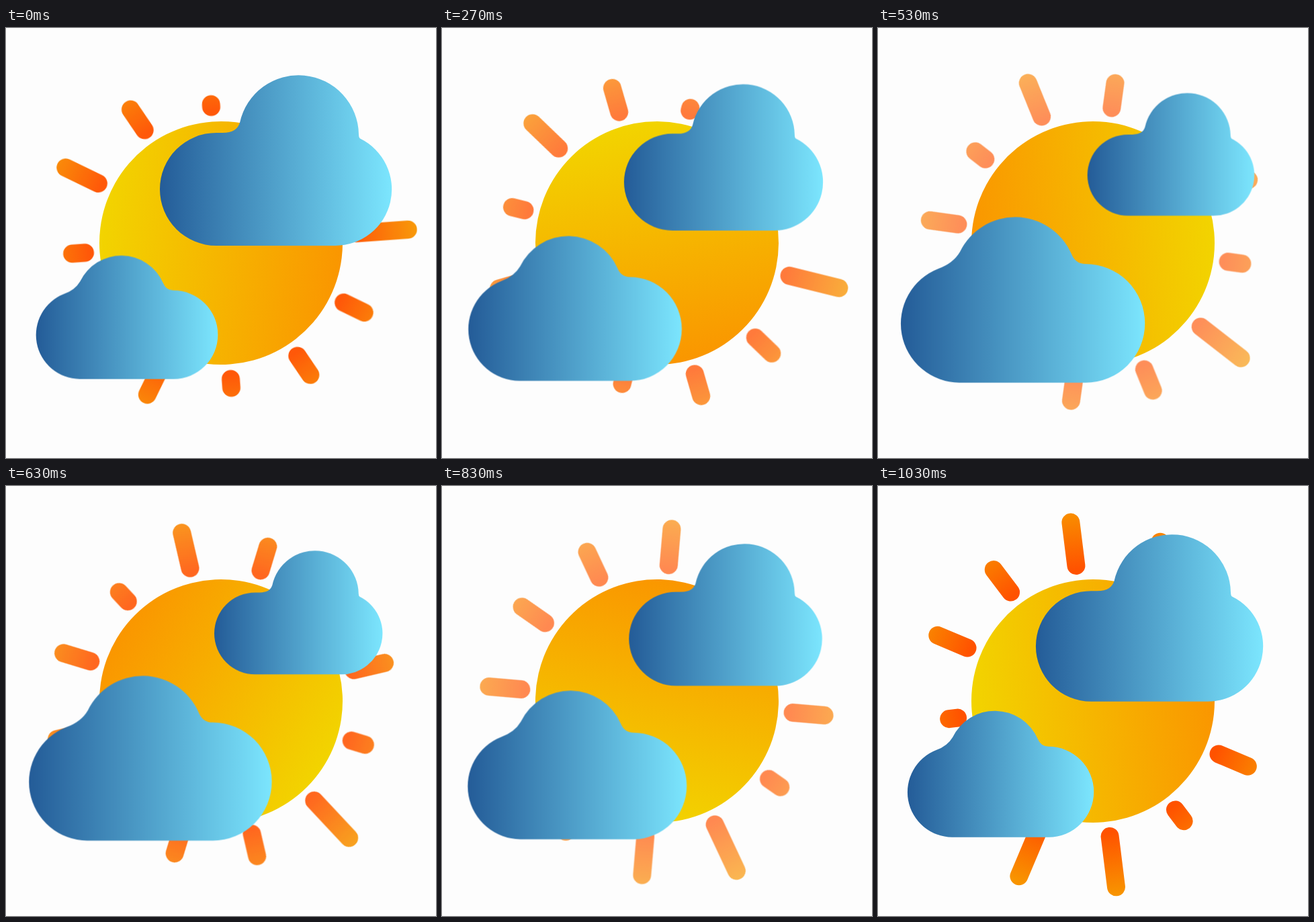
Animation, 640 px wide and 640 px high, one loop 1.06 s. Source, as an HTML page:

```html
<!DOCTYPE html>
<html lang="en">
<head>
<meta charset="utf-8">
<title>Sun and clouds</title>
<style>
  html, body { margin: 0; width: 100%; height: 100%; overflow: hidden; background: #fdfdfd; }
  svg { display: block; width: 100%; height: 100%; }
</style>
</head>
<body>
<svg viewBox="0 0 640 640">
  <defs>
    <linearGradient id="sunFill" x1="0" y1="0" x2="0" y2="1">
      <stop offset="0" stop-color="#f2d400"/>
      <stop offset="1" stop-color="#fa9600"/>
    </linearGradient>
    <radialGradient id="rayFill" gradientUnits="userSpaceOnUse" cx="0" cy="0" r="290">
      <stop offset=".68" stop-color="#ff5200"/>
      <stop offset="1" stop-color="#f89400"/>
    </radialGradient>
    <linearGradient id="cloudFill">
      <stop offset="0" stop-color="#245c98"/>
      <stop offset="1" stop-color="#7ce6fe"/>
    </linearGradient>
  </defs>
  <circle id="sun" cx="320" cy="320" r="181" fill="url(#sunFill)"/>
  <g id="rays" fill="url(#rayFill)"></g>
  <path id="rightCloud" fill="url(#cloudFill)" d="M313 324A84 84 0 0 1 313 156H322C338 156 345 150 348 141A89.5 89.5 0 0 1 525 158Q525 163 527 164.5A84 84 0 0 1 490 324Z"/>
  <path id="leftCloud" fill="url(#cloudFill)" d="M121 528A88 88 0 0 1 90 358Q112 350 122 333A91.4 91.4 0 0 1 288 336Q294 351 309 351A88.5 88.5 0 0 1 309 528Z"/>
</svg>
<script>
const LOOP = 1060, STEP = 100 / 3, CYCLE = 30;
const INNER = 203, CAP = 13.5;
const REACH = [207, 250, 224, 279, 237, 237, 216, 251, 245, 222, 257, 240];

const byId = id => document.getElementById(id);
const sun = byId("sun"), rayGroup = byId("rays");

const rays = REACH.map((_, i) => {
  const ray = document.createElementNS("http://www.w3.org/2000/svg", "rect");
  ray.setAttribute("x", -CAP);
  ray.setAttribute("width", 2 * CAP);
  ray.setAttribute("rx", CAP);
  ray.setAttribute("transform", `rotate(${360 / REACH.length * i})`);
  return rayGroup.appendChild(ray);
});

function smoothstep(from, to, x) {
  const u = Math.min(1, Math.max(0, (x - from) / (to - from)));
  return u * u * (3 - 2 * u);
}

function scaleAbout(id, x, y, scale) {
  byId(id).setAttribute("transform", `translate(${x} ${y}) scale(${scale}) translate(${-x} ${-y})`);
}

function draw(time) {
  // The picture advances in steps and starts slowly after the loop restarts.
  const step = Math.min(31, Math.floor((time % LOOP + 4.9) / STEP));
  const phase = step < 5 ? step * .6 : step - 2;

  sun.setAttribute("transform", `rotate(${360 * phase / CYCLE - 83} 320 320)`);
  rayGroup.setAttribute("transform", `translate(320 320) rotate(${90 * phase / CYCLE - 4.1})`);
  rayGroup.setAttribute("opacity", .825 - .175 * Math.cos(6 * Math.PI * (phase - 14) / CYCLE));

  // Every fifth ray stretches late in the cycle.
  const growth = 46 * smoothstep(20, 26, phase);
  rays.forEach((ray, i) => {
    const reach = REACH[i] + (i % 5 === 4 ? growth : 0);
    ray.setAttribute("y", -reach - CAP);
    ray.setAttribute("height", reach - INNER + 2 * CAP);
  });

  const x = 1 - Math.abs(2 * phase / CYCLE - 1);
  const swell = x + 1.1 * x * x * (1 - x);
  scaleAbout("rightCloud", 524, 165, 1 - .281 * swell);
  scaleAbout("leftCloud", 76, 506, .7445 + .2555 * swell);
}

const start = performance.now();
function tick() {
  draw(performance.now() - start);
  requestAnimationFrame(tick);
}
tick();
</script>
</body>
</html>
```
